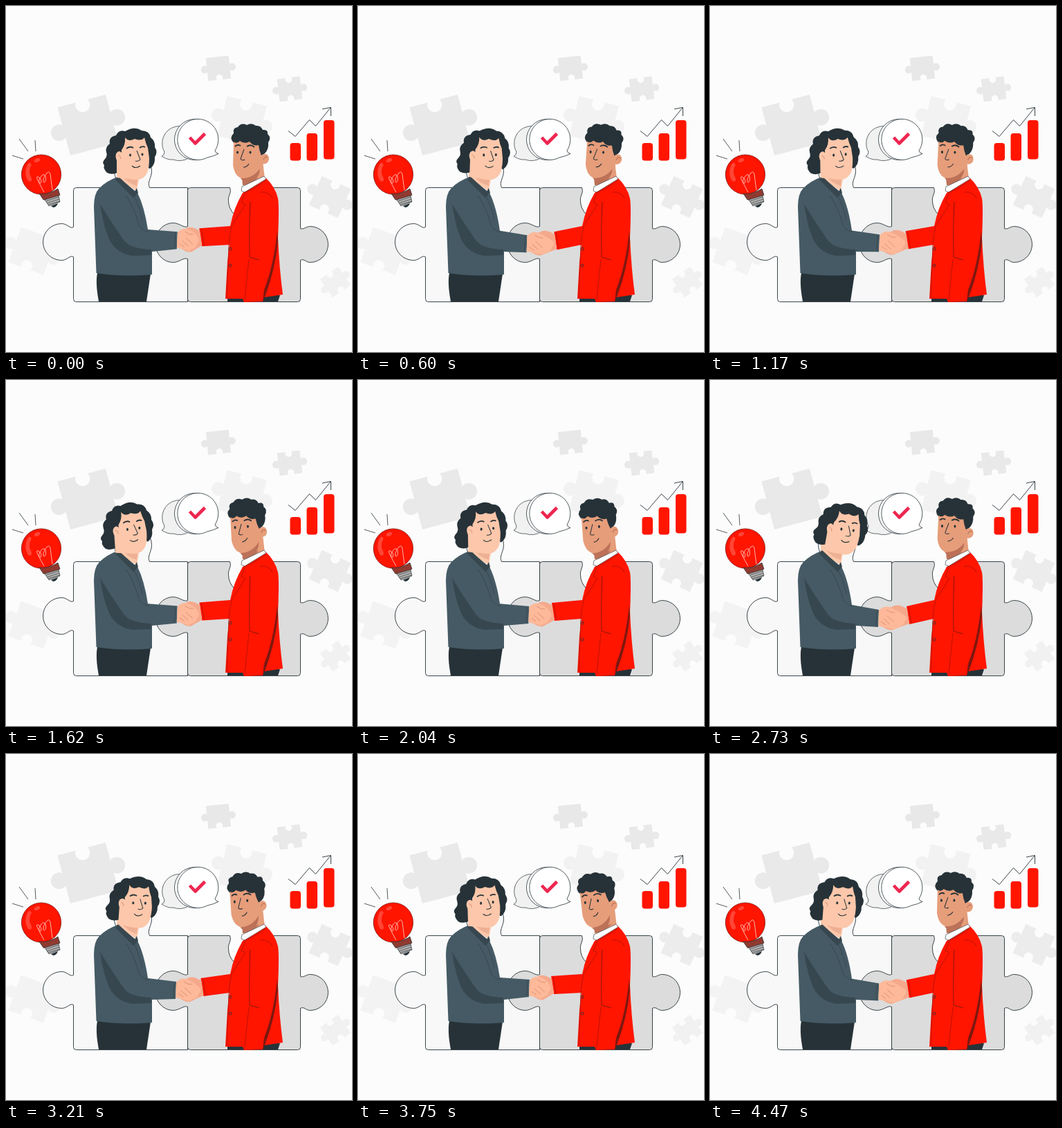
Write an HTML page with a canvas that moves like this. It is 500 px wide and 500 px high and loops after 4.5 s.

```html
<!DOCTYPE html>
<html lang="en">
<head>
<meta charset="utf-8">
<title>Handshake</title>
<style>
html, body { margin: 0; width: 100%; height: 100%; overflow: hidden; background: #fcfcfc; }
canvas { display: block; width: 500px; height: 500px; }
</style>
</head>
<body>
<canvas id="stage" width="500" height="500"></canvas>
<script>
const ctx = document.getElementById('stage').getContext('2d');
const LOOP = 4500;
const BG = '#fcfcfc', INK = '#263238', RED = '#ff1500', DEEP = '#b5130a', MAROON = '#7d1710';
const SWEATER = '#455a64', FOLD = '#37474f';
const PALE = '#fcc7aa', TAN = '#e69d7a', PALM = '#fdb999', BLUSH = '#f5a98c';

// Head tilts as [time, degrees]
const LEFT_TILT = [[0, 0], [450, 2.5], [1120, -0.5], [1680, -4], [2100, -0.5],
  [2730, 10], [3220, 4], [3560, -3], [3780, -1.5], [4320, 2.2], [4500, 4.5]];
const RIGHT_TILT = [[0, 0], [600, 2], [1170, 1.2], [1750, -6], [2040, -6],
  [2650, 1], [2760, 1], [3210, -5.5], [3600, -8.5], [3780, -8], [4350, -0.8], [4500, 0]];

function tween(keys, t) {
  let i = 0;
  while (i < keys.length - 2 && t >= keys[i + 1][0]) i++;
  const slope = k => {
    const a = keys[Math.max(k - 1, 0)], b = keys[Math.min(k + 1, keys.length - 1)];
    return (b[1] - a[1]) / (b[0] - a[0]);
  };
  const [t0, v0] = keys[i], [t1, v1] = keys[i + 1];
  const d = t1 - t0, u = (t - t0) / d, w = 1 - u;
  return v0 * w * w * (1 + 2 * u) + v1 * u * u * (3 - 2 * u)
    + slope(i) * d * u * w * w - slope(i + 1) * d * u * u * w;
}

function shape(d, fill, stroke, width = 0.9) {
  const path = new Path2D(d);
  if (fill) { ctx.fillStyle = fill; ctx.fill(path); }
  if (stroke) { ctx.strokeStyle = stroke; ctx.lineWidth = width; ctx.stroke(path); }
}

const line = (d, color = INK, width = 0.9) => shape(d, null, color, width);

function oval(x, y, rx, ry, fill, stroke, turn = 0) {
  ctx.beginPath();
  ctx.ellipse(x, y, rx, ry, turn, 0, Math.PI * 2);
  if (fill) { ctx.fillStyle = fill; ctx.fill(); }
  if (stroke) { ctx.strokeStyle = stroke; ctx.lineWidth = 0.8; ctx.stroke(); }
}

const dot = (x, y, r, fill, stroke) => oval(x, y, r, r, fill, stroke);

function around(x, y, degrees, draw) {
  ctx.save();
  ctx.translate(x, y);
  ctx.rotate(degrees * Math.PI / 180);
  ctx.translate(-x, -y);
  draw();
  ctx.restore();
}

// notches lists the dented edges: -1 is the top, 1 the bottom.
function jigsaw(x, y, half, degrees, color, notches = [-1, 1]) {
  around(x, y, degrees, () => {
    const r = half * 0.33, out = half * 1.2, dip = half * 0.84;
    ctx.fillStyle = color;
    ctx.fillRect(x - half, y - half, half * 2, half * 2);
    dot(x - out, y, r, color);
    dot(x + out, y, r, color);
    for (const side of notches) dot(x, y + side * dip, r * 0.9, BG);
  });
}

function backdrop() {
  ctx.fillStyle = BG;
  ctx.fillRect(0, 0, 500, 500);
  jigsaw(118.5, 172, 36, -15, '#e9e9e9', [-1]);
  jigsaw(341, 166, 29.5, 14, '#f2f2f2');
  jigsaw(307, 90, 16.5, -6, '#e8e8e8', [1]);
  jigsaw(410, 120, 16.5, -7, '#e9e9e9');
  jigsaw(468, 276, 23, 24, '#ececec');
  jigsaw(38, 354, 27, 20, '#f3f3f3', [1]);
  jigsaw(476, 399, 16, -35, '#f1f1f1');
}

function bulb() {
  line('M19 192L32 210M42 194L43 210M9 216L25 221', INK, 0.8);
  dot(51, 243.5, 28.6, RED, MAROON);
  shape('M31 229Q25 242 32 253Q38 255 37 249Q31 240 37 229Q34 224 31 229Z', '#ff4636');
  oval(45, 223, 4.5, 2.6, '#ff4636', null, -0.4);
  line('M55 269L47 254Q42 245 47 247Q53 252 50 256Q46 256 49 249Q54 240 57 246Q59 253 55 255Q52 252 57 244Q62 236 64 243L67 266', '#ffc4ba', 0.9);
  shape('M48 271Q61 273 75 264L78 273Q67 281 54 280Z', '#8f3a30', INK, 0.7);
  shape('M56 280L76 274L78 283L62 289Z', '#b4b4b4', INK, 0.7);
  line('M58 282L76 276M59 285L77 279M61 287L78 282', '#555', 0.9);
  shape('M65 289L75 285Q73 291 68 291Z', INK);
}

function chart() {
  ctx.fillStyle = RED;
  for (const [x, y, w, bottom] of [[410.5, 198, 15.5, 223.5], [434.5, 184, 15.5, 223.5], [459, 165, 15.5, 221.5]]) {
    ctx.beginPath();
    ctx.roundRect(x, y, w, bottom - y, 4);
    ctx.fill();
  }
  line('M408 180.500L418 188.500L438.500 164.500L447.500 173.500L469 147M457 149L469.500 146.500L469.500 159', INK, 0.9);
}

function bubbles() {
  shape('M229 211A25 25 0 1 1 242 222Q234 223 225 217Q229 216 229 211Z', '#f1f1f1', INK, 0.7);
  dot(273, 193, 29.5, '#fff', INK);
  shape('M302 209A29.500 29.500 0 1 0 291 219Q300 217 307 213.500Q302 212 302 209Z', '#fff', INK, 0.8);
  line('M265.500 190L273.500 198.500L287.500 184.500', '#ee2650', 4.6);
}

function bigPuzzle() {
  ctx.save();
  ctx.translate(0.5, 0.5);
  shape('M101 262H159C163 254 156 248 156 238A27 27 0 0 1 210 238C210 248 203 254 207 262H262V427H101Q97 427 97 423V362C92 359 88 367 80 367A27 26.500 0 0 1 80 314C88 314 92 322 97 319V266Q97 262 101 262Z', '#f8f8f8', INK);
  shape('M266 262H323C326 270 320 273 321 281A27 27 0 0 0 375 281C375 272 367 270 370 262H421Q425 262 425 266V321C430 323 433 318 439 318A26 26 0 0 1 439 370C433 370 430 364 425 367V423Q425 427 421 427H266Q262 427 262 423V365C257 362 250 370 241 370A26 28.500 0 0 1 241 313C250 313 257 321 262 318V266Q262 262 266 262Z', '#dcdcdc', INK);
  ctx.restore();
}

function leftHead() {
  shape('M163 240Q154 245 146 241Q140 235 142 230Q138 226 143 221Q147 217 145 211Q143 204 150 199Q148 189 159 187Q163 178 172 181Q186 173 196 180Q207 180 209 190Q216 195 215 204Q220 211 215 218Q216 230 208 235L200 232Z', INK);
  shape('M167 208Q173 200 172 190Q177 197 186 192Q196 196 200 190Q202 199 205 205L207 220Q207 237 203 243Q197 252 187 251L160 248L160 223Q157 216 160 212Q164 208 167 212Z', PALE);
  line('M162 216Q166 216 166 221', '#d28a70');
  line('M174 206Q179 202 184 205M193 205Q197 202 201 204', INK, 1.8);
  oval(179.500, 215.500, 1.5, 2.1, INK);
  oval(197, 214.500, 1.5, 2.1, INK);
  line('M189 209L194 222Q192 225 187 224', INK, 1);
  line('M182 231Q187 236 194 231', INK, 1.1);
}

function leftMan(tilt, shake) {
  shape('M132 386Q129 400 134 427H203L209 387Z', INK);
  shape('M160 232L160 250L189 267L192 250Z', PALE);
  shape('M168 246Q177 251 190 251L189 260Q176 256 168 246Z', '#eeb094');

  const x = 248 - 4 * shake, top = 326 + 6 * shake, low = top + 25;
  shape(`M161 247Q145 253 135 263Q127 271 127 290L130.500 386Q170 392 211 388L211 355L${x - 1} ${low}L${x} ${top}L205 ${323 + shake * 2}Q200 290 190 270Z`, SWEATER);
  shape('M136 286Q153 314 170 338Q178 351 210 352L210 360L183 361Q161 358 150 339Q140 317 136 286Z', FOLD);
  line(`M174 274Q187 296 193 319Q199 326 207 ${326 + shake}`, FOLD);
  shape('M162 246L158 251L184 277L191 270L189 263L186 268Z', FOLD);
  line('M185 274Q194 293 197 309', FOLD);
  line(`M${x - 3} ${top + 1}L${x - 4} ${low - 1}`, FOLD);
  around(185, 275, tilt, leftHead);
}

function rightHead() {
  shape('M329 198Q322 190 329 184Q327 176 335 175Q340 168 348 172Q355 168 361 173Q368 172 371 179Q379 178 378 185Q384 190 379 197Q380 207 374 213L368 217L340 203Z', INK);
  shape('M329 196Q333 200 338 195Q345 200 352 196Q357 203 365 201Q366 209 369 216Q373 212 378 215Q382 221 378 226Q375 229 371 228L371 246L357 250Q347 254 338 248Q330 244 328 230Z', TAN);
  shape('M339 249Q356 250 367 235Q366 250 353 255Q344 256 339 249Z', '#bd7158');
  line('M372 222Q374 216 378 219', '#a65e49');
  line('M331 203Q335 199 339 202M348 203Q354 199 359 204', INK, 1.8);
  oval(334.500, 211.500, 1.5, 2.1, INK);
  oval(353, 211.500, 1.5, 2.1, INK);
  line('M344 207L339 221Q341 224 345 222', INK, 1);
  line('M343 233Q348 233 351 228', INK, 1.1);
}

function rightMan(tilt, shake) {
  shape('M320 418H396L393 427H320Z', INK);
  shape('M340 240L371 224L374 250L346 271Z', TAN);
  shape('M341 248Q357 251 368 238L369 242Q358 258 342 259Z', '#bd7158');
  const x = 279 + 5 * shake, y = 321 + 6 * shake;
  shape(`M342 270L375 248Q389 261 393 278Q395 290 393 335Q395 380 400 417L373 421L371 427L344 428L342 423L317 423L320 370L323 345L${x + 4} ${y + 26}L${x} ${y}L324 318Q329 292 342 270Z`, RED);
  around(354, 256, tilt, rightHead);
  shape('M341 261L373 246L376 250L345 269L340 267Z', '#fff', INK, 0.6);
  line('M346 269L340 284L346 287L326 318Q322 338 322 346L319 422', DEEP);
  line('M346 269Q360 264 375 252M367 269Q381 268 385 278', DEEP);
  line('M353 283Q351 320 352 363L366 367', MAROON);
  line('M351 366L345 424', DEEP);
  shape('M392 325Q387 375 373 410L371 427L375 418Q389 380 393 340Z', MAROON);
  line(`M${x + 3} ${y + 1}L${x + 7} ${y + 25}`, DEEP);
  dot(324, 351, 2, null, INK);
  dot(324, 375, 2, null, INK);
}

function hands(shake) {
  const lx = 248 - 4 * shake, ly = 326 + 6 * shake;
  const rx = 279 + 5 * shake, ry = 321 + 6 * shake;
  shape(`M${rx + 1} ${ry + 4}Q${rx - 10} ${ry - 3} ${rx - 17} ${ry - 1}L${lx + 3} ${ly + 2}L${lx + 2} ${ly + 21}Q${lx + 12} ${ly + 31} ${lx + 20} ${ly + 29}L${rx + 4} ${ry + 25}Z`, BLUSH);
  shape(`M${lx} ${ly + 1}Q${lx + 7} ${ly - 6} ${lx + 15} ${ly - 4}Q${lx + 25} ${ly} ${rx - 1} ${ry + 14}Q${rx + 1} ${ry + 19} ${rx - 3} ${ry + 22}Q${rx - 5} ${ry + 30} ${rx - 11} ${ry + 30}Q${rx - 16} ${ry + 35} ${lx + 14} ${ly + 27}L${lx - 1} ${ly + 23}Z`, PALM);
  const mark = '#d98d73';
  line(`M${lx + 11} ${ly}Q${lx + 17} ${ly + 5} ${lx + 23} ${ly + 4}`, mark);
  line(`M${lx + 3} ${ly + 17}l7 5m-3 -9l9 8m-4 -12l10 9`, mark);
}

function draw(t) {
  // The clasped hands sink and rise as one slow wave.
  const shake = (1 + Math.cos(2 * Math.PI * (t - 2730) / 1900)) / 2;
  backdrop();
  bulb();
  chart();
  bubbles();
  bigPuzzle();
  rightMan(tween(RIGHT_TILT, t), shake);
  leftMan(tween(LEFT_TILT, t), shake);
  hands(shake);
}

const start = performance.now();
function frame(now) {
  draw(Math.max(0, now - start) % LOOP);
  requestAnimationFrame(frame);
}
ctx.lineJoin = 'round';
draw(0);
requestAnimationFrame(frame);
</script>
</body>
</html>
```
